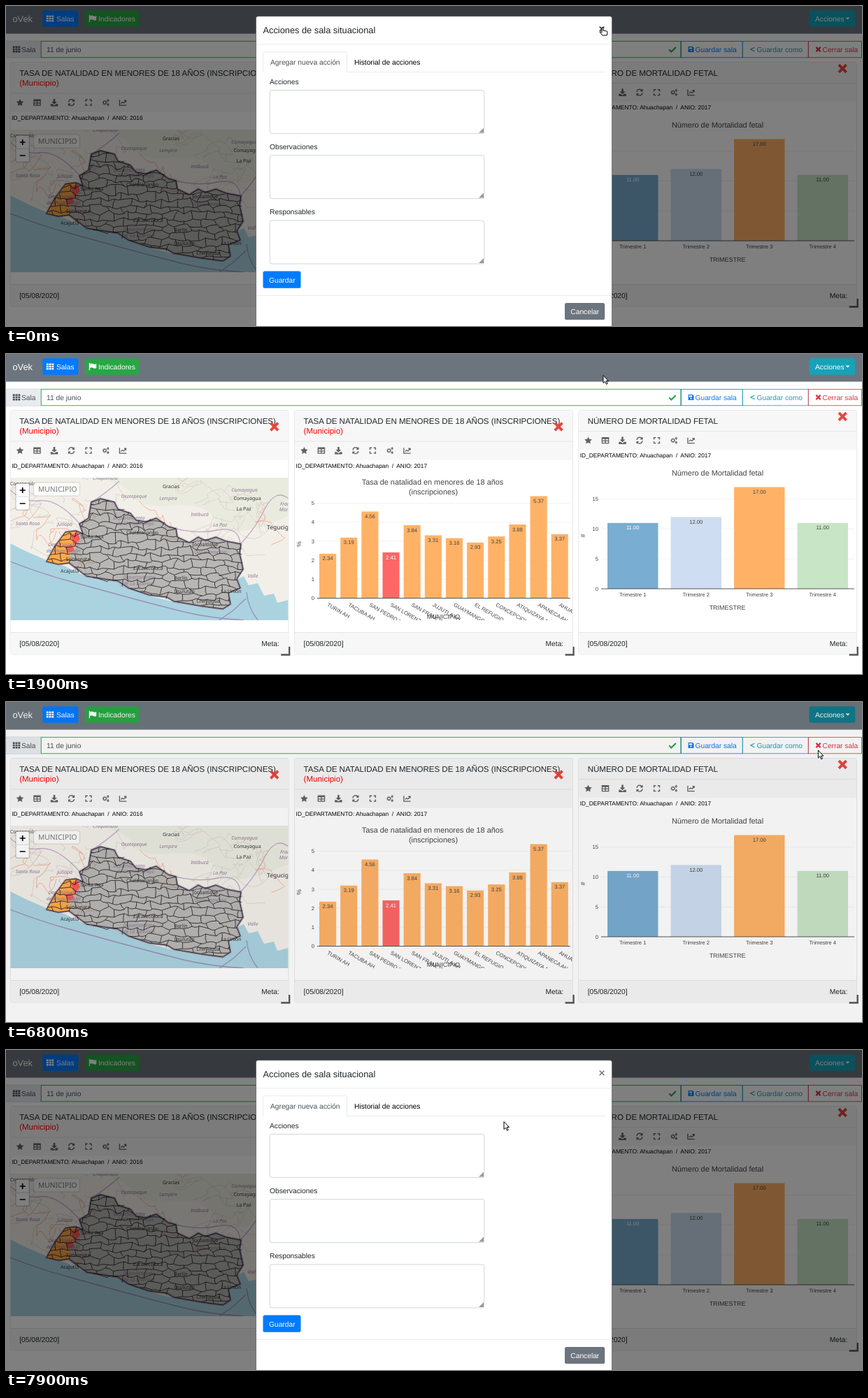
An HTML page that plays this animation: 1224x458 px, repeating every 8000 ms.

```html
<!DOCTYPE html>
<html lang="es">
<head>
<meta charset="utf-8">
<title>Sala situacional</title>
<style>
  html, body { margin: 0; width: 100%; height: 100%; overflow: hidden; background: #fff; }
  svg { display: block; font-family: "Liberation Sans", Arial, sans-serif; text-rendering: geometricPrecision; }
  .map text { font-family: "Noto Sans", sans-serif; }
</style>
</head>
<body>
<svg id="stage" width="1224" height="458" viewBox="0 0 1224 458"></svg>
<script>
const FONT = 10.24, INK = '#212529';

// Icons in a 16 x 16 box: [path, stroke width or 0 for filled]
const ICONS = {
  grid: ['M0 1h4.4v4H0zM5.8 1h4.4v4H5.8zM11.6 1H16v4h-4.4zM0 6h4.4v4H0zM5.8 6h4.4v4H5.8zM11.6 6H16v4h-4.4zM0 11h4.4v4H0zM5.8 11h4.4v4H5.8zM11.6 11H16v4h-4.4z', 0],
  flag: ['M0 0h2v16H0zM2 2q3.500-2 7 0t7 0v9q-3.500 2-7 0t-7 0z', 0],
  check: ['M1 8.500l4.500 4.500L15 3.500', 3],
  save: ['M1 1h11l3 3v11H1zM3 3v4h8V3zM8 9a2 2 0 1 0 .1 0z', 0],
  nodes: ['M13 3L3 8l10 5M12 3h1M3 8h1M12 13h1', 2],
  cross: ['M3 3l10 10M13 3L3 13', 3.600],
  star: ['M8 0l2.400 5 5.600.8-4 4 1 5.700-5-2.700-5 2.700 1-5.700-4-4 5.600-.8z', 0],
  table: ['M0 1h16v14H0zM2 5v3h5V5zM9 5v3h5V5zM2 10v3h5v-3zM9 10v3h5v-3z', 0],
  download: ['M6 0h4v6h4l-6 6-6-6h4zM0 11h4l4 3 4-3h4v5H0z', 0],
  refresh: ['M2 7a6 6 0 0 1 11-3M14 9a6 6 0 0 1-11 3M14 1v4h-4M2 15v-4h4', 2],
  expand: ['M2 6V2h4M10 2h4v4M14 10v4h-4M6 14H2v-4', 2.200],
  cogs: ['M6 5a3 3 0 1 0 .1 0M6 3v2M6 11v2M1 8h2M9 8h2M2.500 4.500L4 6M8 10l1.500 1.500M9.500 4.500L8 6M4 10l-1.500 1.500M13 2a1.500 1.500 0 1 0 .1 0M13 11a1.500 1.500 0 1 0 .1 0M13 .5V2M13 5v1.500M13 9.500V11M13 14v1.500', 1.800],
  chart: ['M1 2v12h15M4 10l3-3 3 2 5-5M11 3.500h4v4', 2],
  export: ['M1 0h7v4h4v3H6v3h6v6H1zM9 0l3 3H9zM12 5l4 3.500-4 3.500z', 0],
  bookmark: ['M2.500 0h11v16L8 12l-5.500 4z', 0],
  forward: ['M9 1l7 6-7 6V9.500Q3 9 3 15-3 5 9 4.500z', 0],
  filter: ['M0 1h16l-6 7v8l-4-3V8z', 0],
};

const icon = (name, cx, cy, size, color) => {
  const [d, w] = ICONS[name];
  const paint = w ? `fill="none" stroke="${color}" stroke-width="${w}"` : `fill="${color}" fill-rule="evenodd"`;
  return `<path d="${d}" ${paint} transform="translate(${cx - size / 2} ${cy - size / 2}) scale(${size / 16})"/>`;
};
const text = (x, y, str, size = FONT, fill = INK, more = '') =>
  `<text x="${x}" y="${y}" font-size="${size}" fill="${fill}" ${more}>${str}</text>`;
const middle = (x, y, str, size, fill, more = '') => text(x, y, str, size, fill, 'text-anchor="middle" ' + more);
const box = (x, y, w, h, fill, more = '') =>
  `<rect x="${x}" y="${y}" width="${w}" height="${h}" fill="${fill}" ${more}/>`;
const line = (d, color, w = .7, more = '') => `<path d="${d}" fill="none" stroke="${color}" stroke-width="${w}" ${more}/>`;
const frameBox = (x, y, w, h, fill, color, r = 2.600) => box(x, y, w, h, fill, `rx="${r}" stroke="${color}" stroke-width=".7"`);

let seed = 11;
const random = () => (seed = seed * 16807 % 2147483647) / 2147483647;
const jitter = a => (random() - .5) * 2 * a;

function topBars() {
  const outlined = (x, w, name, label, color) =>
    box(x + .4, 50.400, w - .8, 23.400, '#fff', `stroke="${color}" stroke-width=".8"`) +
    icon(name, x + 14.500, 62, name == 'cross' ? 10 : 9, color) + text(x + 20.500, 65.800, label, FONT, color);
  return box(0, 0, 1224, 39.600, '#6c757d') + text(9.500, 22.500, 'oVek', 12.800, '#fff') +
    box(52.300, 6.200, 51, 23.600, '#007bff', 'rx="2.600"') + icon('grid', 63, 18, 10.500, '#fff') + text(72, 21.700, 'Salas', FONT, '#fff') +
    box(113, 6.200, 77, 23.600, '#28a745', 'rx="2.600"') + icon('flag', 124, 18, 10.500, '#fff') + text(132, 21.700, 'Indicadores', FONT, '#fff') +
    box(1148.600, 6.200, 65.600, 23.600, '#17a2b8', 'rx="2.600" id="actions"') + text(1157, 21.700, 'Acciones', FONT, '#fff') +
    '<path d="M1200.500 16.500h6l-3 3z" fill="#fff"/>' +
    box(0, 50, 50, 24.200, '#e9ecef', 'stroke="#ced4da" stroke-width=".7"') + icon('grid', 15, 62, 10.500, '#495057') + text(22, 65.800, 'Sala', FONT, '#495057') +
    box(50.300, 50.400, 914.500, 23.400, '#fff', 'stroke="#28a745" stroke-width=".9"') + text(58, 65.800, '11 de junio', FONT, '#495057') +
    icon('check', 953, 62, 11, '#28a745') +
    outlined(965, 88.500, 'save', 'Guardar sala', '#007bff') +
    outlined(1053, 94.500, 'nodes', 'Guardar como', '#17a2b8') +
    outlined(1147, 77, 'cross', 'Cerrar sala', '#dc3545');
}

function panel(x, year, title, subtitle, body) {
  const top = subtitle ? 125 : 110.500, icons = ['star', 'table', 'download', 'refresh', 'expand', 'cogs', 'chart'];
  return frameBox(x, 80.500, 397.800, 349.500, '#fff', '#dfdfdf') +
    box(x + .4, 81, 397, top - 54.300, '#f7f7f7') + line(`M${x} ${top}h397.800`, '#dfdfdf') +
    text(x + 13, 100, title, 11.520) + (subtitle ? text(x + 13, 114, subtitle, 11.520, '#f00') : '') +
    icon('cross', x + 377.500, top - 21, 17, '#e8463c') +
    icons.map((name, i) => icon(name, x + 13.800 + i * 24.500, top + 13.200, 10.500, '#626262')).join('') +
    text(x + 2, top + 37.600, `ID_DEPARTAMENTO: Ahuachapan &#160;/&#160; ANIO: ${year}`, 8.400, '#000') + body +
    box(x + .4, 398.500, 397, 31.200, '#f7f7f7') + line(`M${x} 398.500h397.800`, '#dfdfdf') +
    text(x + 13, 417.800, '[05/08/2020]') + text(x + 359, 417.800, 'Meta:') +
    line(`M${x + 387} 430.500h12V419`, '#555', 2.300);
}

function map() {
  const country = 'M58 297L70 275 85 255 100 253 110 257 105 243 118 235 122 212 135 207 155 212 160 222 178 228 186 238 200 240 215 235 232 247 243 250 245 262 262 270 275 262 285 267 300 262 315 268 336 272 334 285 339 308 330 322 335 335 318 342 321 358 310 365 280 361 240 354 230 348 205 345 175 335 160 325 140 322 115 318 90 299 75 301z';
  let mesh = '';
  const cols = 27, rows = 19, node = [];
  for (let k = 0; k < cols * rows; k++) node.push([56 + k % cols * 11 + jitter(4), 203 + (k / cols | 0) * 9.300 + jitter(3.500)]);
  const edge = (a, b) => mesh += `M${node[a]}Q${(node[a][0] + node[b][0]) / 2 + jitter(3)} ${(node[a][1] + node[b][1]) / 2 + jitter(3)} ${node[b]}`;
  for (let j = 0; j < rows - 1; j++) for (let i = 0; i < cols - 1; i++) {
    const k = j * cols + i;
    edge(k, k + 1);
    if ((i + j) % 2) edge(k, k + cols);
  }
  let roads = '', tracks = '';
  for (let i = 0; i < 26; i++) {
    let d = `M${6 + random() * 398} ${170 + random() * 120}`;
    for (let j = 0; j < 6; j++) d += `q${jitter(14)} ${jitter(14)} ${jitter(26)} ${jitter(22)}`;
    i % 3 ? tracks += d : roads += d;
  }
  const place = (x, y, str, size = 7) => middle(x, y, str, size, '#333');
  const region = (x, y, str) => middle(x, y, str, 7, '#8d7895', 'font-style="italic"');
  return `<g class="map" clip-path="url(#mapArea)">` + box(6, 177, 398, 204, '#f2efe9') +
    '<path d="M120 177q50 5 60 25t60 15 60 25 104-10V177z" fill="#e4e8d5" opacity=".5"/>' +
    line(tracks, '#d9cfc8', .8) + line(roads, '#f0b49a', 1) +
    line('M6 195q20 18 42 15t50 25 10 20M122 212q20-12 40-30M243 250q30 8 60 2t32 20q20-20 35-50t34-15', '#bfa9c4', 1.300) +
    '<path d="M6 271L30 283 60 296 85 304 115 319 160 326 205 346 240 355 280 362 310 366 322 358 319 343 335 336 331 322 340 318 347 331 360 328 369 346 383 343 388 356 404 352V381H6z" fill="#aad3df"/>' +
    line('M6 297Q50 314 90 325T170 347 250 368 340 381M360 381q-14-18-16-40M305 381l20-14 18-17', '#9b8fb5', 1.300) +
    line(country, '#9a7fa6', 3.500, 'opacity=".55"') + `<path d="${country}" fill="#858585" opacity=".52"/>` +
    '<path d="M58 297L70 275 85 255 100 253 105 265 92 285 90 298 75 301z" fill="#ffa94d"/>' +
    '<path d="M93 260l9-6 4 11-9 9zM84 275l10-2 4 8-9 4z" fill="#fb5a5a"/>' +
    region(176, 237, 'Departamento') + region(185, 245, 'de Chalatenango') + region(83, 275, 'Departamento') +
    region(82, 284, 'de Ahuachapán') + region(292, 286, 'Departamento') + region(190, 322, 'Departamento') + region(190, 331, 'de La Libertad') +
    `<g clip-path="url(#country)">${line(mesh, '#151515', .9, 'opacity=".85"')}</g>` + line(country, '#222', 1) +
    region(142, 180, 'Chiquimula') + region(183, 206, 'Ocotepeque') + region(232, 209, 'Lempira') + region(277, 232, 'Intibucá') +
    region(306, 247, 'La Paz') + region(31, 245, 'Santa Rosa') + region(84, 246, 'Jutiapa') + region(341, 197, 'Comayagua') +
    region(353, 320, 'Valle') + region(399, 217, 'Fran') + region(399, 225, 'Mora') +
    place(22, 188, 'e Concepción') + place(236, 192, 'Gracias') + place(345, 209, 'Comayagua') + place(340, 224, 'La Paz') +
    place(123, 264, 'Santa Ana') + place(195, 258, 'Chalatenango') + place(103, 296, 'Sonsonate') + place(91, 313, 'Acajutla') + place(203, 309, 'Zacatecoluca') +
    place(250, 323, 'Berlín') + place(255, 342, 'Usulután') + place(285, 275, 'Jocoaitique') + place(289, 356, 'Chirilagua') + place(322, 342, 'La Unión') +
    text(373, 251, 'Tegucigalpa', 8.500, '#333') +
    box(13.400, 184.400, 20.500, 39.500, '#0003', 'rx="3"') + box(14.500, 185.500, 18.300, 37.300, '#fff', 'rx="2"') + line('M14.500 204.200h18.300', '#ccc') +
    line('M19.700 195h8M23.700 191v8M19.700 214h8', '#000', 1.700) +
    box(39.500, 184, 66, 19, '#ffffffcc', 'rx="3" stroke="#0002"') + text(46, 197, 'MUNICIPIO', FONT, '#777') + '</g>';
}

// Bars: {x, pitch, zero, unit, step} in stage units
function chart({ x, pitch, zero, unit, step, ticks }, values, fills, decimals = 2) {
  const right = x + pitch * values.length;
  let out = '';
  for (let i = 0; i < ticks; i++) {
    const y = zero - i * step * unit;
    out += (i ? line(`M${x} ${y}H${right}`, '#eee') : '') + text(x - 4, y + 2.700, i * step, 7.680, '#444', 'text-anchor="end"');
  }
  values.forEach((v, i) => {
    const fill = fills[i] || fills[0], top = zero - v * unit, light = fill == '#79add2' || fill == '#f66';
    out += box(x + pitch * (i + .1), top, pitch * .8, v * unit, fill) +
      middle(x + pitch * (i + .5), top + 9.600, v.toFixed(decimals), 7.680, light ? '#fff' : '#444');
  });
  return out + line(`M${x} ${zero}H${right}`, '#444', .9);
}

function townChart() {
  const towns = ['TURIN AH', 'TACUBA AH', 'SAN PEDRO PUXTLA AH', 'SAN LORENZO AH', 'SAN FRANCISCO AH', 'JUJUTLA AH', 'GUAYMANGO AH', 'EL REFUGIO AH', 'CONCEPCION AH', 'ATIQUIZAYA AH', 'APANECA AH', 'AHUACHAPAN AH'];
  return '<g clip-path="url(#townArea)">' +
    chart({ x: 445, pitch: 30.150, zero: 349.500, unit: 27.200, step: 1, ticks: 6 },
      [2.34, 3.19, 4.56, 2.41, 3.84, 3.31, 3.16, 2.93, 3.25, 3.88, 5.37, 3.37], ['#ffb266', , , '#f66']) +
    towns.map((name, i) => text(0, 0, name, 7.680, '#444', `transform="translate(${458.500 + i * 30.150} 360.500) rotate(30)"`)).join('') +
    middle(610, 187, 'Tasa de natalidad en menores de 18 años', 10.880, '#444') + middle(611, 201, '(inscripciones)', 10.880, '#444') +
    middle(625.500, 379, 'MUNICIPIO', 8.960, '#444') + middle(0, 0, '%', 8.960, '#444', 'transform="translate(422 272) rotate(-90)"') + '</g>';
}

function quarterChart() {
  return chart({ x: 851, pitch: 90.500, zero: 336, unit: 8.560, step: 5, ticks: 4 }, [11, 12, 17, 11], ['#79add2', '#ceddf1', '#ffb266', '#c8e5c6']) +
    [1, 2, 3, 4].map(n => middle(805.700 + n * 90.500, 347, 'Trimestre ' + n, 7.680, '#444')).join('') +
    middle(1017.500, 173.500, 'Número de Mortalidad fetal', 10.880, '#444') + middle(1031.500, 365.500, 'TRIMESTRE', 8.960, '#444') +
    middle(0, 0, '#', 8.960, '#444', 'transform="translate(828 260) rotate(-90)"');
}

function menu() {
  const items = [['export', 1074, 'Exportar'], ['bookmark', 1070, 'Acciones de sala situacional'], ['forward', 1073, 'Compartir sala'], ['filter', 1072.500, 'Filtros generales']];
  return '<g id="menu">' + frameBox(1040.700, 32, 173.300, 92, '#fff', '#c4c4c4') + box(1041, 57.500, 172.700, 20.500, '#007bff', 'id="pressed"') +
    items.map(([name, x, label], i) => `<g ${i == 1 ? 'id="item"' : ''} fill="${INK}">` +
      icon(name, name == 'bookmark' ? 1062 : 1063.500, 47.500 + i * 20.500, 10.500, 'inherit') + text(x, 51.300 + i * 20.500, label, FONT, 'inherit') + '</g>').join('') + '</g>';
}

function modal() {
  const field = (label, y) => text(377, y - 9, label) + frameBox(377.300, y, 306.500, 62, '#fff', '#bfc5cb') +
    `<path d="M683 ${y + 54}v7h-7z" fill="#999"/>`;
  return '<g id="modal">' + frameBox(357.500, 14.700, 509, 444.800, '#fff', '#555', 3) +
    text(367.500, 39, 'Acciones de sala situacional', 12.800) + text(847.400, 38, '×', 15.400, '#000', 'font-weight="bold" id="close"') +
    box(838, 15.500, 28, 34.500, 'none', 'stroke="#000" stroke-width=".8" stroke-dasharray="1 1" id="focus"') +
    line('M358 54.700h508.500M358 414.500h508.500M487.500 94.500h369', '#dee2e6') +
    line('M367.500 94.500V68q0-2.500 2.500-2.500h115q2.500 0 2.500 2.500v26.500', '#dee2e6') +
    text(378, 83.800, 'Agregar nueva acción', FONT, '#495057') + text(498, 83.800, 'Historial de acciones', FONT, '#000') +
    field('Acciones', 120.500) + field('Observaciones', 213.600) + field('Responsables', 307) +
    box(367.500, 379.600, 54, 24.200, '#007bff', 'rx="2.600"') + text(376, 395.500, 'Guardar', FONT, '#fff') +
    '<g id="cancel">' + box(799, 425, 57.200, 24, '#6c757d', 'rx="2.600"') + text(807.300, 440.800, 'Cancelar', FONT, '#fff') + '</g></g>';
}

const birthTitle = 'TASA DE NATALIDAD EN MENORES DE 18 AÑOS (INSCRIPCIONES)';
const countryClip = 'M58 297L70 275 85 255 100 253 110 257 105 243 118 235 122 212 135 207 155 212 178 228 186 238 215 235 243 250 245 262 262 270 285 265 336 272 339 308 330 322 335 335 318 342 321 358 310 365 240 354 175 335 115 318 90 299 75 301z';
const stage = document.getElementById('stage');
stage.innerHTML = `<defs><clipPath id="mapArea">${box(6.400, 177, 397, 204, '#000')}</clipPath>
  <clipPath id="townArea">${box(413, 165, 397, 216, '#000')}</clipPath>
  <clipPath id="country"><path d="${countryClip}"/></clipPath></defs>` +
  box(0, 0, 1224, 458, '#fff') + topBars() +
  panel(6.200, 2016, birthTitle, '(Municipio)', map()) +
  panel(412.600, 2017, birthTitle, '(Municipio)', townChart()) +
  panel(818.700, 2017, 'NÚMERO DE MORTALIDAD FETAL', '', quarterChart()) +
  menu() + box(0, 0, 1224, 458, '#000', 'id="backdrop"') + modal() +
  `<g id="cursor" stroke="#000" fill="#fff" stroke-linejoin="round">
    <path id="arrow" d="M0 0v11l2.500-2.200 2 4 1.700-.9-2-3.800H7.500z"/>
    <path id="hand" d="M-1 1q1-1.500 2 0v4l5 1q1.200.5 1 2l-.8 4H0L-4 7.500q.5-1.500 3 .5z"/></g>`;

const el = Object.fromEntries([...stage.querySelectorAll('[id]')].map(e => [e.id, e]));
const set = (e, props) => { for (const k in props) e.setAttribute(k, props[k]); };
const show = (e, on) => set(e, { visibility: on ? 'visible' : 'hidden' });
const ramp = (t, a, b) => Math.min(1, Math.max(0, (t - a) / (b - a)));
const easeOut = x => 1 - (1 - x) ** 1.65;

// Pointer path: time, x, y
const PATH = [[0, 853, 30], [1600, 853, 30], [1700, 854, 30.500], [2100, 854, 30.500], [2300, 1030, 22], [2400, 1111, 31], [2900, 1111, 31],
  [3000, 1184, 12], [3700, 1184, 12], [4400, 1063, 66], [4600, 1095, 69], [4700, 1095, 69], [4800, 1115, 70], [4900, 1115, 70],
  [5000, 1142, 70], [5200, 1142, 70], [5500, 1162, 69], [7500, 1161, 69], [7700, 900, 36], [7900, 712, 102.500], [8000, 712, 102.500]];

function pointer(t) {
  const i = PATH.findIndex(p => p[0] > t), [t0, x0, y0] = PATH[i - 1], [t1, x1, y1] = PATH[i];
  const k = (t - t0) / (t1 - t0);
  return [x0 + (x1 - x0) * k, y0 + (y1 - y0) * k];
}

function draw() {
  const t = Math.floor(performance.now() % 8000 / 100) * 100;
  const closing = t < 4000, open = t >= 3400 && t < 6800, hand = t < 1700 || t >= 3000 && t < 6800;
  const dim = closing ? 1 - ramp(t, 1750, 1880) : ramp(t, 6767, 7100);
  const alpha = closing ? 1 - ramp(t, 1697, 1850) : ramp(t, 6805, 6955);
  const shift = closing ? -32 * easeOut(ramp(t, 1696, 1996)) : -32 * (1 - easeOut(ramp(t, 6805, 7105)));
  set(el.backdrop, { opacity: dim / 2 });
  set(el.modal, { opacity: alpha, transform: `translate(0 ${shift})` });
  set(el.cancel, { opacity: t >= 1700 && t < 7200 ? .65 : 1 });
  set(el.close, { opacity: t < 1700 ? .8 : .5 });
  show(el.focus, t >= 1500 && t < 1700);
  show(el.menu, open);
  show(el.pressed, open && t >= 6600);
  set(el.item, { fill: t >= 6600 ? '#fff' : INK });
  set(el.actions, { fill: t >= 3400 && t < 7100 ? '#117a8b' : t >= 3000 && t < 3400 ? '#138496' : '#17a2b8' });
  set(el.cursor, { transform: `translate(${pointer(t)})` });
  show(el.arrow, !hand);
  show(el.hand, hand);
  requestAnimationFrame(draw);
}
draw();
</script>
</body>
</html>
```
